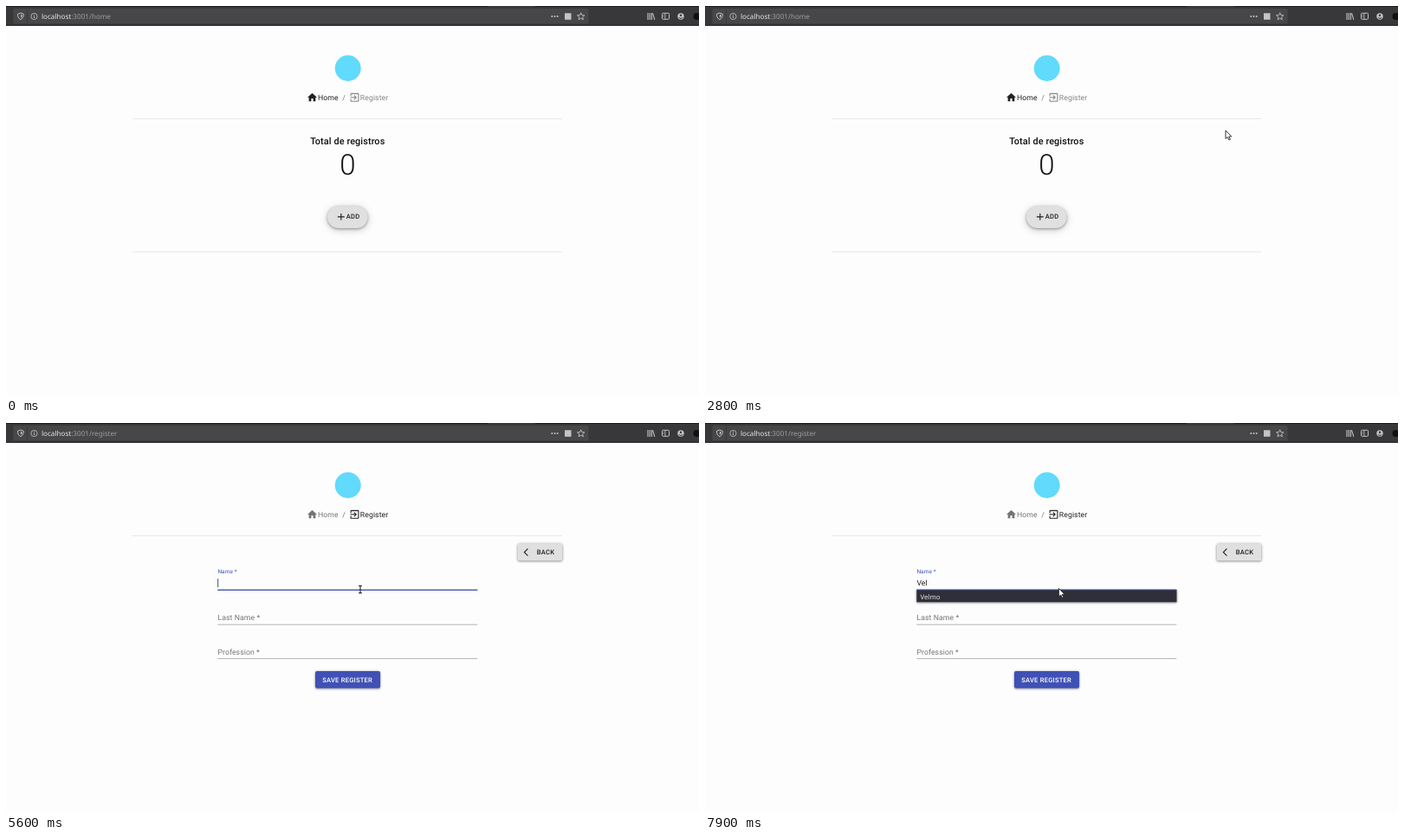
An HTML page for the animation above (8 s loop, 800 px wide and 450 px high).

```html
<!DOCTYPE html>
<html lang="en">
<head>
<meta charset="utf-8">
<title>Register form</title>
<style>
html, body { margin: 0; width: 100%; height: 100%; overflow: hidden; background: #fefdfe; }
svg { display: block; width: 800px; height: 450px; text-rendering: geometricPrecision; }
text { font: 8.7px Roboto, sans-serif; letter-spacing: .08px; fill: #757575; }
.ui { font: 7.85px "Noto Sans", "Open Sans", sans-serif; letter-spacing: 0; fill: #e6e6e8; }
.btn { font-weight: 500; font-size: 7.6px; letter-spacing: .215px; fill: #1f1f1f; }
.mid { text-anchor: middle; }
.raised { filter: drop-shadow(0 1px 1px #0005) drop-shadow(0 .5px 1.5px #0003); }
.float { filter: drop-shadow(0 1.6px 1.6px #0005) drop-shadow(0 2px 4px #0003); }
.line { stroke: #949494; stroke-width: .7; }
.icons { fill: none; stroke: #c4c4c6; stroke-width: 1; }
.icons .solid { fill: #c4c4c6; stroke: none; }
</style>
</head>
<body>
<svg viewBox="0 0 800 450">
  <rect width="800" height="450" fill="#fefdfe"/>

  <!-- Browser bar -->
  <rect width="800" height="23" fill="#38383b"/>
  <rect width="800" height="1" fill="#1d1b20"/>
  <rect x="556" width="55" height="1" fill="#39383d"/>
  <rect y="22" width="800" height="1" fill="#252528"/>
  <rect x="8.5" y="3" width="664" height="17.5" rx="1.5" fill="#474749"/>
  <path d="M24.5 4v16" stroke="#39393c"/>
  <g class="icons">
    <path d="M13.5 9.3l3.4-1.3 3.4 1.3c0 3-.8 5-3.4 6.4-2.6-1.4-3.4-3.4-3.4-6.4z"/>
    <path d="M17 9.8v4c1-.7 1.6-1.7 1.7-3.4z" class="solid"/>
    <circle cx="32.5" cy="12" r="3.6" stroke-width=".8"/>
    <path d="M32.5 11.4v2.7M32.5 9.6v1" stroke-width=".9"/>
    <g class="solid">
      <circle cx="630.3" cy="12" r="1"/><circle cx="633.5" cy="12" r="1"/><circle cx="636.7" cy="12" r="1"/>
      <rect x="645" y="8.3" width="7.5" height="7.5"/>
    </g>
    <path d="M663.7 7.8l1.2 2.8 3 .2-2.3 2 .7 3-2.6-1.6-2.6 1.6.7-3-2.3-2 3-.2z" stroke-width=".9"/>
    <path d="M741 8v8M743.2 8v8M745.4 8v8M746.6 8.3l2.2 7.5" stroke-width="1.1"/>
    <rect x="757.5" y="8.3" width="8" height="7" rx="1"/>
    <path d="M761 8.5v6.8M758.7 10.5h1.2M758.7 12.5h1.2" stroke-width=".8"/>
    <circle cx="779" cy="12" r="3.7" class="solid"/>
    <circle cx="779" cy="10.8" r="1.2" fill="#38383b" stroke="none"/>
    <path d="M776.8 13.6q2.2 1.6 4.4 0" stroke="#38383b"/>
  </g>
  <circle cx="797.5" cy="12" r="4" fill="#111113"/>
  <text class="ui" x="41" y="15" style="font-size:8.1px">localhost<tspan id="path" fill="#9d9d9f"></tspan></text>

  <!-- Header -->
  <circle cx="394.7" cy="72" r="15" fill="#61dafb"/>
  <g id="navHome">
    <path transform="translate(346.9 99.2) scale(.55)" d="M10 20v-6h4v6h5v-8h3L12 3 2 12h3v8z"/>
    <text x="360" y="108.8" style="fill:inherit">Home</text>
  </g>
  <text x="388.2" y="108.8">/</text>
  <g id="navRegister">
    <path transform="translate(395.9 99.2) scale(.55)" d="M10.09 15.59L11.5 17l5-5-5-5-1.41 1.41L12.67 11H3v2h9.67zM19 3H5c-1.11 0-2 .9-2 2v4h2V5h14v14H5v-4H3v4c0 1.1.89 2 2 2h14c1.1 0 2-.9 2-2V5c0-1.1-.9-2-2-2z"/>
    <text x="408.8" y="108.8" style="fill:inherit">Register</text>
  </g>
  <path d="M146 130.4h496" stroke="#e2e6ea"/>

  <g id="home">
    <text class="mid" x="394.3" y="159.8" style="font-weight:500;font-size:10.9px;fill:#111">Total de registros</text>
    <text class="mid" x="394.4" y="195.3" style="font-weight:300;font-size:33px;letter-spacing:0;fill:#111">0</text>
    <rect id="add" class="float" x="371" y="231.3" width="46.6" height="25.8" rx="12.9"/>
    <path transform="translate(380.1 237.2) scale(.56)" d="M19 13h-6v6h-2v-6H5v-2h6V5h2v6h6z" fill="#1f1f1f"/>
    <text class="btn" x="392.8" y="246.4">ADD</text>
    <path d="M146 284.3h496" stroke="#e2e6ea"/>
  </g>

  <g id="form">
    <rect class="raised" x="590.7" y="139.5" width="51.6" height="19.7" rx="2" fill="#e0e0e0"/>
    <path transform="translate(597.6 144.1) scale(.45)" d="M11.67 3.87L9.9 2.1 0 12l9.9 9.9 1.77-1.77L3.54 12z" fill="#1f1f1f"/>
    <text class="btn" x="612.8" y="152.2">BACK</text>
    <text id="label" x="244.4">Name *</text>
    <text x="244.4" y="228.2">Last Name *</text>
    <text x="244.4" y="267.9">Profession *</text>
    <path class="line" d="M244.3 193.4h300M244.3 233.2h300M244.3 272.6h300"/>
    <path id="hover" d="M244.3 193.3h300" stroke="#222" stroke-width="1.1"/>
    <path id="focus" stroke="#3f51b5" stroke-width="1.3"/>
    <text id="value" x="244.4" y="188" style="fill:#212121"></text>
    <path id="caret" stroke="#222" stroke-width=".8"/>
    <rect class="raised" x="357" y="287" width="75" height="19.7" rx="2" fill="#3f51b5"/>
    <text class="btn" x="365.2" y="299.5" style="fill:#fff">SAVE REGISTER</text>
    <g id="tip">
      <rect x="408.3" y="203.3" width="100" height="24.2" rx="2" fill="#2d2d36" stroke="#202026" stroke-width=".5"/>
      <text class="ui" x="416" y="218.3">Please fill out this field.</text>
    </g>
    <g id="list">
      <rect class="raised" x="244.3" y="193" width="300.2" height="14.2" fill="#2e2f39"/>
      <path d="M244.3 193.4h300" stroke="#3f51b5" stroke-width=".8" stroke-dasharray="1 1"/>
      <text class="ui" x="248.4" y="203.8">Velmo</text>
    </g>
  </g>

  <path id="arrow" d="M0 0v9.6l2.3-2 1.6 3.4 1.5-.7-1.6-3.3h3z" fill="#fff" stroke="#222" stroke-width=".9"/>
  <path id="beam" d="M-2-4.2h1.4l.6.6.6-.6H2M-2 4.2h1.4l.6-.6.6.6H2M0-3.6v7.2" fill="none" stroke="#222" stroke-width="1.1"/>
</svg>
<script>
const LOOP = 8000, STEP = 100;
const ENTER = 2600, PAGE = 4300, HOVER = 4900, FOCUS = 5300, TIP = 6000, TYPE = 7100, LIST = 7300;
const WORD = "Vel";
// Pointer keys: time, x, y
const track = [
  [2600, 768, 98], [2700, 626, 133], [2800, 601, 144], [3100, 545, 178], [3600, 441, 240],
  [3900, 402, 244], [4300, 400, 243], [4500, 428, 220], [4700, 437, 207],
  [5000, 413, 192], [5200, 409, 192.5], [7200, 409, 192.5], [7300, 408.4, 191.3]
];
const el = id => document.getElementById(id);
const show = (id, on) => el(id).style.display = on ? "" : "none";
const clamp = v => Math.max(0, Math.min(1, v));
const mix = (a, b, k) => a + (b - a) * k;

function pointer(t) {
  const i = track.findIndex(key => key[0] > t);
  if (i < 0) return track[track.length - 1].slice(1);
  if (i === 0) return track[0].slice(1);
  const [a, b] = [track[i - 1], track[i]];
  const k = (t - a[0]) / (b[0] - a[0]);
  return [mix(a[1], b[1], k), mix(a[2], b[2], k)];
}

function draw(t) {
  const onForm = t >= PAGE, typed = WORD.slice(0, Math.max(0, (t - TYPE) / STEP + 1));
  show("home", !onForm);
  show("form", onForm);
  el("path").textContent = ":3001/" + (onForm ? "register" : "home");
  el("navHome").style.fill = onForm ? "#757575" : "#212121";
  el("navRegister").style.fill = onForm ? "#212121" : "#858585";

  const [x, y] = pointer(t);
  el("add").style.fill = t >= 3800 ? "#d5d5d5" : "#e0e0e0";

  const lift = 1 - (1 - clamp((t - FOCUS) / 200)) ** 3;
  const label = el("label");
  label.setAttribute("y", mix(188.4, 174.4, lift));
  label.style.fontSize = mix(8.7, 6.5, lift) + "px";
  label.style.fill = t >= FOCUS ? "#3f51b5" : "#757575";
  show("hover", t >= HOVER && t < FOCUS);
  el("focus").setAttribute("d", `M${394.3 - 150 * lift} 193.2h${300 * lift}`);

  el("value").textContent = typed;
  const lastKey = typed ? Math.min(t, LIST) : FOCUS;
  const caretX = 244.7 + (typed ? el("value").getComputedTextLength() : 0);
  el("caret").setAttribute("d", `M${caretX} 180v10`);
  show("caret", t >= FOCUS && (t - lastKey) % 1200 < 600);
  show("tip", t >= TIP && t < TYPE);
  show("list", t >= LIST);

  const beam = t >= HOVER && t < LIST;
  show("beam", beam);
  show("arrow", t >= ENTER && !beam);
  for (const id of ["arrow", "beam"]) el(id).setAttribute("transform", `translate(${x} ${y})`);
}

const start = performance.now();
function tick() {
  draw(Math.floor((performance.now() - start) % LOOP / STEP) * STEP);
  requestAnimationFrame(tick);
}
tick();
</script>
</body>
</html>
```
